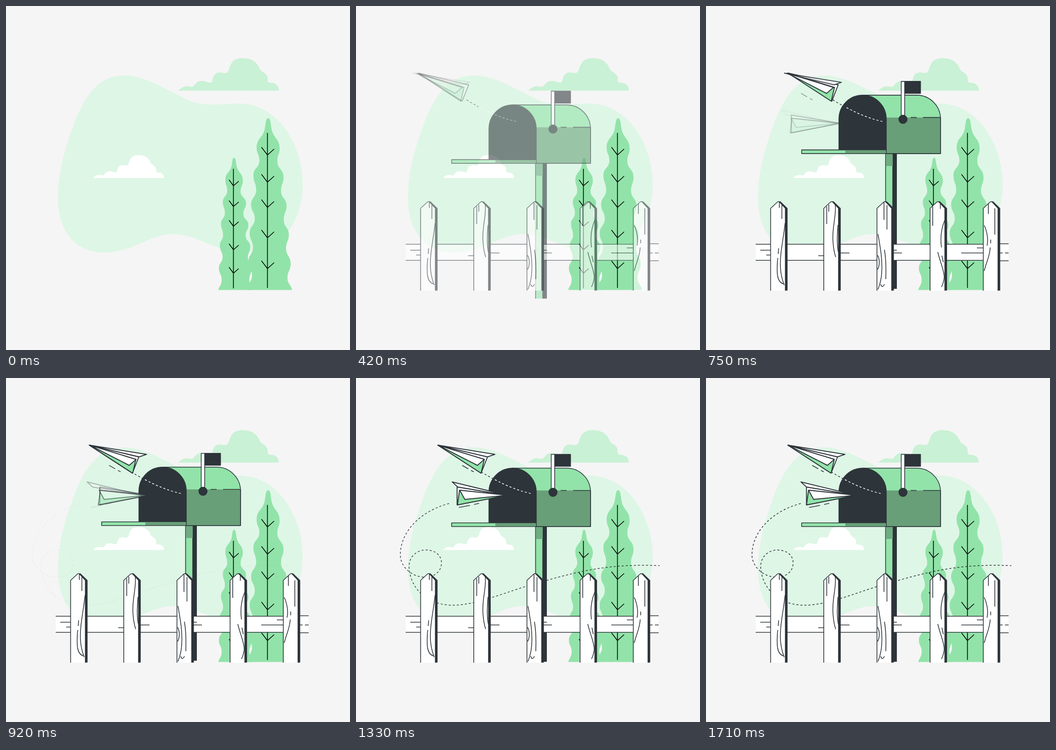
An HTML page for the animation above (1750 ms loop, 748x748 px).

```html
<!DOCTYPE html>
<html lang="en">
<head>
<meta charset="utf-8">
<title>Paper planes and a mailbox</title>
<style>
  html, body { margin: 0; width: 100%; height: 100%; overflow: hidden; background: #f5f5f5; }
  svg { display: block; width: 100%; height: 100%; }
  .line { fill: none; }
  .ink { stroke: #2d343a; stroke-width: 1.6; stroke-linejoin: round; }
  .plane { stroke-width: 2; }
  .dark { fill: #2d343a; }
  .green { fill: #92e3a9; }
  .shade { fill: #689f78; }
  .white { fill: #fff; }
  .dash { stroke-dasharray: 4.5 4.3; stroke-width: 1.5; }
</style>
</head>
<body>
<svg viewBox="0 0 748 748">
  <path fill="#def6e6" d="M258 151C300 151 350 182 395 204C425 219 460 213 507 212C590 212 645 300 645 388C645 430 632 465 616 487C590 528 535 550 463 526C430 514 400 496 362 496C315 496 275 536 213 536C150 536 113 490 113 415C113 370 125 320 140 278C165 205 195 151 258 151Z"/>
  <defs>
    <path id="cloud" d="M374 184C382 178 386 174 394 174.500C400 175 404 177 407 175C412 168 417 162 428 163C437 164 442 168 447 166C450 162 449 155 454 149C460 142 470 145 477 146C486 144 483 138 488 129C493 116 503 113.500 515 113.500C535 113.500 546 122 552 137C553 143 570 146 569 158C568 164 570 167 575 167C586 167 593 173 593 182V184Z"/>
  </defs>
  <use href="#cloud" fill="#c9f1d5"/>
  <use href="#cloud" fill="#fff" transform="translate(-74.700 244.300) scale(.705)"/>
  <g id="trees"></g>

  <!-- data-move: dx, dy, start ms, duration ms -->
  <g class="ink" data-move="0 44.900 0 1000">
    <path class="green" d="M390.500 617V323H406V617"/>
    <path fill="#70ab82" stroke="none" d="M391.300 323H406V350H391.300Z"/>
    <path class="dark" stroke="none" d="M406 323H415V617H406Z"/>
    <path class="green" d="M340 196H458A52 52 0 0 1 510 248V323H392V248Z"/>
    <path class="shade" stroke="none" d="M392 244.500H509.800V322.500H392Z"/>
    <path class="line" d="M445 244.500H458M472 244.500H510V323H392"/>
    <path class="dark" d="M289 315V248A51.500 52 0 0 1 392 248V315Z"/>
    <path class="green" d="M208 315H392V323H208Z"/>
    <path class="shade" stroke="none" d="M303 315.800H391.200V322.300H303Z"/>
    <path class="dark" d="M432 166H466.500V192H432Z"/>
    <path class="white" d="M424.500 166H432V246H424.500Z"/>
    <circle class="dark" cx="428.300" cy="248.500" r="9"/>
  </g>

  <path class="ink line dash" data-move="-44.900 0 817 850" d="M206 273C150 287 100 330 100 385C100 410 125 433 153 433C175 433 189.500 420 189.500 402C189.500 385 175 374 156 374C134 374 118 390 119 412C121 450 150 494 215 494C270 494 340 460 415 441C500 417 560 404 664 408"/>

  <g class="ink" data-move="0 0 0 1000">
    <path class="white" stroke="none" d="M108 518H658V553H108Z"/>
    <path class="line" d="M108 518H638M108 553H638M638 517H658M638 554H658M118 531H140M131 541.500H140M244 543H256M291 537H312M407 531H415M407 537H426M555 537H603M589 526H603M639 537H645M650 537H658"/>
    <g id="pickets"></g>
    <path class="line" d="M159.500 427V439M165 431V463M172 472C168 510 160 540 162 570C163 590 168 600 170 607M158 527L157 539M156 548C153 580 154 600 168 604
      M267 432V447M262.500 436V474M281 432C284 455 274 480 276 510C277 530 280 540 282 546M287 476C285 500 284 520 288 536
      M387 427V465M393.500 433V486M374 496C380 530 384 555 382 580C381 600 376 610 374 616M388 530C393 560 391 580 391 594M373 542C378 550 378 565 373 573M380 605q3 10 8 0
      M509.500 428V441M493 436V478M519 466C509 490 510 510 512 525M504 535C510 560 518 575 518 590C517 600 514 607 512 611M513 543L516 557
      M614 430V452M628 440V497M605 477C612 492 614 510 611 521M619 508V516M618 525C617 545 610 555 605 576"/>
  </g>

  <g data-move="-60 0 120 800">
    <path class="ink line dash" d="M272 204Q285 212 298 219"/>
    <path class="line dash" stroke="#fff" d="M302 221Q345 244 384 252"/>
  </g>
  <path class="ink line" data-move="-44.900 0 440 850" d="M231 190L244 197.500M250 201L256 204"/>
  <g class="ink plane">
    <path class="white" data-move="-60 0 180 800" d="M178 146L286 171.500L272 207Z"/>
    <path class="green" data-move="-60 0 200 800" d="M178 146L279 177L272 207Z"/>
    <path class="white" data-move="-60 0 230 800" d="M178 146L279 177L264 190Z"/>
    <path class="white" data-move="-60 0 290 800" d="M178 146L302 166L286 171.500Z"/>
  </g>

  <path class="ink line" data-move="-44.900 0 760 850" d="M224 281.500L248 277M257 275L268 272.500"/>
  <g class="ink plane">
    <path class="white" data-move="-44.900 0 520 850" d="M218.500 237L218.500 276L326 255Z"/>
    <path class="green" data-move="-44.900 0 550 850" d="M223 244L218.500 276L326 255Z"/>
    <path class="white" data-move="-44.900 0 575 850" d="M223 244L234 264L326 255Z"/>
    <path class="white" data-move="-44.900 0 660 850" d="M206.500 226L326 255L218.500 237Z"/>
  </g>
</svg>
<script>
const LOOP = 1750, FRAME = 1000 / 24;
const byId = id => document.getElementById(id);

// Joins points with curves whose tangents are vertical.
function wave(points) {
  return points.slice(1).map(([x, y], i) => {
    const [px, py] = points[i], half = (y - py) / 2;
    return `C${px} ${py + half} ${x} ${y - half} ${x} ${y}`;
  }).join('');
}

// The crown starts at the tip; both sides are listed downwards.
function tree({ tip: [x, y], width, height, right, left, foot, stem, stemTop, stemEnd, twigs, reach }) {
  const [rx, ry] = right[0], [lx, ly] = left[0];
  const [endRx, endRy] = right.at(-1), [endLx, endLy] = left.at(-1);
  const [footL, footR] = foot, shoulder = y + height;
  const outline = `M${x} ${y}C${x + width * .6} ${y} ${x + width * .7} ${y + height * .3} ${x + width} ${shoulder}`
    + `C${x + width + 3} ${shoulder + (ry - shoulder) / 2} ${rx} ${shoulder + (ry - shoulder) / 2} ${rx} ${ry}`
    + wave(right)
    + `C${endRx} ${endRy + 12} ${footR - 2} ${endRy + 14} ${footR} 617.500H${footL}`
    + `C${footL + 2} ${endLy + 14} ${endLx} ${endLy + 12} ${endLx} ${endLy}`
    + wave([...left].reverse())
    + `C${lx} ${shoulder + (ly - shoulder) / 2} ${x - width - 3} ${shoulder + (ly - shoulder) / 2} ${x - width} ${shoulder}`
    + `C${x - width * .7} ${y + height * .3} ${x - width * .6} ${y} ${x} ${y}Z`;
  const [rl, ul, rr, ur] = reach;
  const veins = `M${stem} ${stemTop}V${stemEnd}`
    + twigs.map(v => `M${stem - rl} ${v - ul}L${stem} ${v}L${stem + rr} ${v - ur}`).join('');
  return `<path class="green" d="${outline}"/><path class="line" stroke="#000" stroke-width="1.6" d="${veins}"/>`;
}

byId('trees').innerHTML = tree({
  tip: [570, 244], width: 7, height: 21, foot: [525, 622],
  right: [[595, 310], [590, 337], [603.5, 372], [598, 402], [610, 434], [604, 465], [615, 497], [609, 527], [619, 560], [612, 592]],
  left: [[545, 308], [551, 336], [538, 368], [544, 400], [533, 432], [541, 462], [530, 494], [537, 525], [527, 556], [535, 586]],
  stem: 568.5, stemTop: 276, stemEnd: 613, twigs: [324, 383, 438, 504, 571], reach: [13, 17, 14.5, 13]
}) + tree({
  tip: [496, 330], width: 5, height: 16, foot: [461.5, 536],
  right: [[515, 380], [510, 403], [522, 429], [516, 452], [527, 476], [521, 499], [531, 523], [526, 548], [534, 571], [529, 595]],
  left: [[477, 378], [481, 402], [471.5, 426], [476, 450], [467.5, 474], [472, 498], [465, 521], [471, 546], [463, 570], [469, 595]],
  stem: 494.5, stemTop: 354, stemEnd: 614, twigs: [391, 436, 479, 530, 581], reach: [9.5, 13, 11.5, 10]
});

byId('pickets').innerHTML = [0, 1, 2, 3, 4].map(i => `<g transform="translate(${140.5 + i * 115.6} 0)">
  <path class="dark" d="M16 425.500H21L36 440V618H32V440Z"/>
  <path class="white" d="M0 619V440L14 427Q17 424 20 427L32 440V619"/></g>`).join('');

// Cubic Bezier easing (.36, -.01, .5, 1.38) with a slight overshoot.
function ease(x) {
  if (x <= 0) return 0;
  if (x >= 1) return 1;
  const curve = (s, a, b) => 3 * a * s * (1 - s) ** 2 + 3 * b * s * s * (1 - s) + s ** 3;
  let low = 0, high = 1;
  for (let i = 0; i < 24; i++) {
    const mid = (low + high) / 2;
    if (curve(mid, .36, .5) < x) low = mid; else high = mid;
  }
  return curve(low, -.01, 1.38);
}

const movers = [...document.querySelectorAll('[data-move]')].map(node => {
  const [dx, dy, start, duration] = node.dataset.move.split(' ').map(Number);
  return { node, dx, dy, start, duration };
});

function draw(now) {
  // The motion runs in steps of 24 per second.
  const time = Math.floor((now % LOOP) / FRAME + .1) * FRAME;
  for (const { node, dx, dy, start, duration } of movers) {
    const p = ease((time - start) / duration);
    node.setAttribute('transform', `translate(${dx * (1 - p)} ${dy * (1 - p)})`);
    node.setAttribute('opacity', Math.max(0, Math.min(1, p)));
  }
}

let origin;
function tick(now) {
  origin ??= now;
  draw(now - origin);
  requestAnimationFrame(tick);
}
draw(0);
requestAnimationFrame(tick);
</script>
</body>
</html>
```
